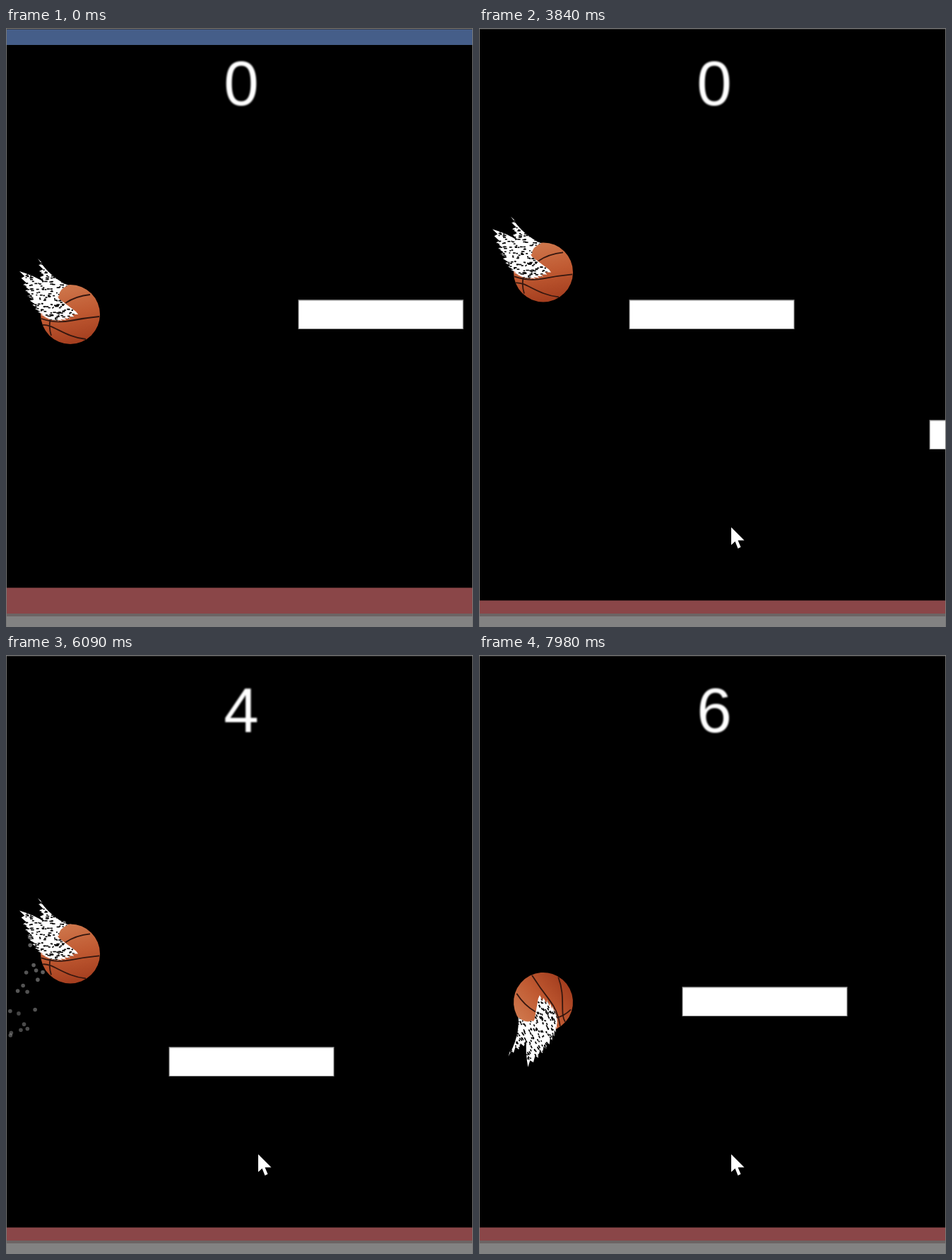
An HTML page with a canvas for the animation above (8000 ms loop, 661 px wide and 847 px high).

```html
<!DOCTYPE html>
<html lang="en">
<head>
<meta charset="utf-8">
<title>Winged ball</title>
<style>
  html, body { margin: 0; width: 100%; height: 100%; overflow: hidden; background: #000; }
  canvas { display: block; }
</style>
</head>
<body>
<canvas id="stage" width="661" height="847"></canvas>
<script>
const ctx = document.getElementById('stage').getContext('2d');
const LOOP = 8000, START = 2727;
const GRAVITY = 0.0025, FLAP = -0.83, SPEED = 0.1806;
const BALL_X = 91, RADIUS = 42, HOOP_WIDTH = 233, HOOP_GAP = 425;
const SWISH = 4835, RIM_HIT = 7300, RIM_SCORE = 7564;

const clamp = v => Math.min(1, Math.max(0, v));
const random = n => { const s = Math.sin(n * 127.1 + 3.7) * 43758.5453; return s - Math.floor(s); };

function rect(color, x, y, w, h) {
  ctx.fillStyle = color;
  ctx.fillRect(x, y, w, h);
}

// Each kick sets the vertical speed; gravity acts in between
const flap = t => ({ t, v: FLAP });
const kicks = [
  { t: 3210, v: 0 },
  ...[3265, 3952, 4093, 4915, 5622, 6329, 6551].map(flap),
  { t: RIM_HIT, v: -0.16 },
  flap(7650)
];

// After a flap the ball leans back quickly, then levels out as it starts to fall
function fly(kick, t) {
  const dt = t - kick.t, v = kick.v + GRAVITY * dt;
  const ramp = kick.lean + (1 - kick.lean) * clamp(dt / 80);
  return {
    y: kick.y + kick.v * dt + GRAVITY * dt * dt / 2,
    lean: kick.v === FLAP ? ramp * clamp(1 - v / 0.255) : 0
  };
}
kicks.forEach((k, i) => Object.assign(k, i ? fly(kicks[i - 1], k.t) : { y: 405, lean: 0 }));

function ballAt(t) {
  const kick = kicks.filter(k => k.t <= t).pop();
  return kick ? fly(kick, t) : { y: 405, lean: 0 };
}

// A blade has a smooth leading edge and a ragged trailing edge of feather tips
function blade(root, trail, tip, lead, end, feathers) {
  const path = new Path2D();
  for (let i = 0; i <= feathers * 2; i++) {
    const p = i / feathers / 2, q = 1 - p, notch = i % 2 * 6;
    const at = k => q * q * root[k] + 2 * p * q * trail[k] + p * p * tip[k];
    path.lineTo(at(0) + notch, at(1) + notch / 3);
  }
  path.quadraticCurveTo(...lead, ...end);
  path.closePath();
  return path;
}
const wing = blade([8, -4], [-48, 36], [-72, -61], [-28, -48], [-16, -22], 19);
wing.addPath(blade([-42, -28], [-42, -52], [-46, -79], [-28, -52], [-3, -41], 6));
wing.addPath(new Path2D('M-42 -30L-3 -41Q-16 -36 -16 -26L-30 -20Z'));

const seams = new Path2D('M-41 6Q-20 13 0 9T41 3M-7 -16Q8 -26 28 -28M-39 15C-25 13 -8 32 22 35M-28 6Q-31 17 -27 30');
const leather = ctx.createLinearGradient(-10, -42, 8, 42);
leather.addColorStop(0, '#cf784d');
leather.addColorStop(0.5, '#c05a32');
leather.addColorStop(1, '#a33d1e');

function drawBall({ y, lean }) {
  ctx.save();
  ctx.translate(BALL_X, y);
  ctx.rotate(-117 * lean * Math.PI / 180);
  ctx.fillStyle = leather;
  ctx.beginPath();
  ctx.arc(0, 0, RADIUS, 0, 7);
  ctx.fill();
  ctx.strokeStyle = '#35170f';
  ctx.lineWidth = 1.8;
  ctx.stroke(seams);
  ctx.fillStyle = '#fff';
  ctx.fill(wing);
  ctx.clip(wing);
  // Feather marks
  for (let i = 0; i < 270; i++) {
    const along = random(i), across = random(i + 500) - 0.5;
    rect('#000', -60 + along * 64 + across * 34, -62 + along * 70 - across * 42, 1.5 + 3 * random(i + 900), 1.6);
  }
  ctx.restore();
}

// After a clean score the ball leaves a trail until it touches a rim
function drawTrail(t) {
  if (t > RIM_SCORE) return;
  const gap = 14, life = 520;
  const first = Math.ceil(Math.max(SWISH, t - life) / gap);
  const last = Math.floor(Math.min(RIM_HIT, t) / gap);
  for (let i = first; i <= last; i++) {
    const age = t - i * gap;
    ctx.fillStyle = `rgba(150,150,150,${0.85 - 0.4 * age / life})`;
    ctx.beginPath();
    ctx.arc(BALL_X - SPEED * age + (random(i) - 0.5) * 44,
      ballAt(i * gap).y + (random(i + 300) - 0.5) * 44, 2.8, 0, 7);
    ctx.fill();
  }
}

// Hoops enter at the right and vanish once scored
function drawHoops(t) {
  const scroll = SPEED * Math.max(0, t - START) + 0.04 * Math.max(0, t - RIM_HIT);
  const scored = (t >= SWISH) + (t >= RIM_SCORE);
  [385, 555, 470].forEach((y, i) => {
    const x = Math.round(414 + HOOP_GAP * i - scroll);
    if (i < scored || x > 650) return;
    rect('#808080', x - 0.5, y - 1, HOOP_WIDTH + 1, 42);
    rect('#fff', x + 0.5, y + 0.5, HOOP_WIDTH - 1, 39.5);
  });
}

function drawScore(t) {
  ctx.save();
  ctx.filter = 'blur(0.8px)';
  ctx.font = '89px "Liberation Sans", Arial, sans-serif';
  ctx.textAlign = 'center';
  ctx.fillStyle = '#fff';
  ctx.fillText(t < SWISH ? 0 : t < RIM_SCORE ? 4 : 6, 333, 109);
  ctx.restore();
}

function drawBars(t) {
  const menu = t < 800, top = menu ? 791.5 : 809.5;
  if (menu) rect('#455e89', 0, 2, 661, 22);
  rect('#8a4648', 0, top, 661, 828 - top);
  rect('#6c6464', 0, 828, 661, 4);
  rect('#828282', 0, 832, 661, 15);
  rect('#777', 0, 0, 661, 1.5);
  rect('#777', 0, 0, 1, 847);
  rect('#777', 660, 0, 1, 847);
}

// Pointer glides: start, duration, dx, dy
const glides = [[500, 120, 23, 50], [1045, 225, 165, 299], [1460, 560, 98, 169], [2320, 120, 25, 70]];
const arrow = new Path2D('M0 0V25L5.5 20L9.5 30L13.5 28L9.5 18.5H18.5Z');

function drawPointer(t) {
  if (t < 500) return;
  ctx.save();
  ctx.translate(46, 118);
  for (const [start, duration, dx, dy] of glides) {
    const p = clamp((t - start) / duration);
    ctx.translate(dx * p, dy * p);
  }
  ctx.fillStyle = '#fff';
  ctx.fill(arrow);
  ctx.restore();
}

function render(now) {
  const t = now % LOOP;
  rect('#000', 0, 0, 661, 847);
  drawScore(t);
  drawTrail(t);
  drawBall(ballAt(t));
  drawHoops(t);
  drawBars(t);
  drawPointer(t);
  requestAnimationFrame(render);
}
requestAnimationFrame(render);
</script>
</body>
</html>
```
